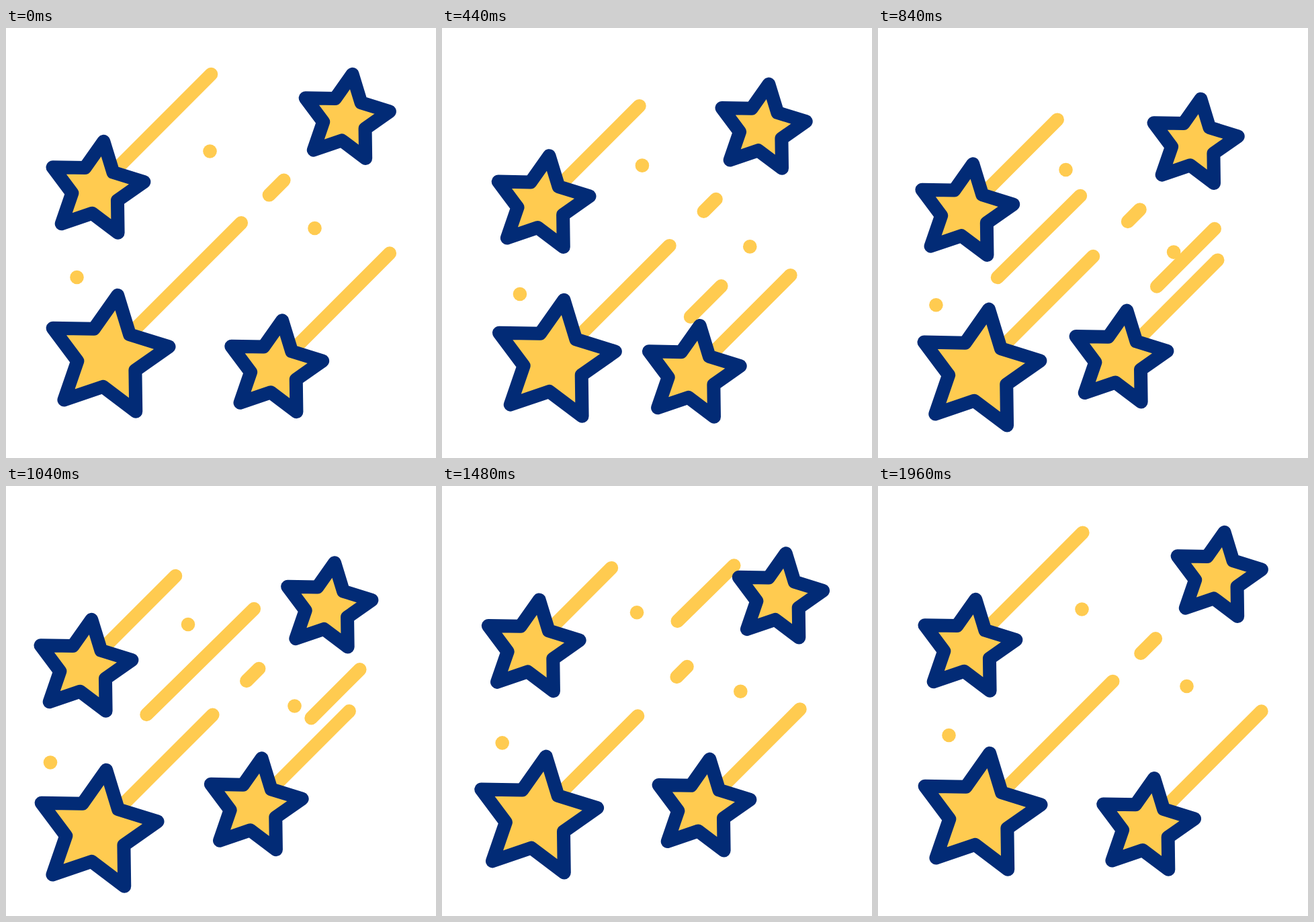
Recreate the animation shown at these times as an HTML page. Size 640x640 px, loop 2000 ms.

```html
<!DOCTYPE html>
<html lang="en">
<head>
<meta charset="utf-8">
<title>Shooting stars</title>
<style>
  html, body { margin: 0; width: 100%; height: 100%; overflow: hidden; background: #fff; }
  svg { display: block; width: 100%; height: 100%; }
  line { stroke: #ffcb50; }
  circle { fill: #ffcb50; }
  polygon { fill: #ffcb50; stroke: #022b76; }
  line, polygon { stroke-width: 20; stroke-linecap: round; stroke-linejoin: round; }
</style>
</head>
<body>
<svg viewBox="0 0 640 640"></svg>
<script>
const LOOP = 2000, STEP = 40;
const svg = document.querySelector('svg');

function add(parent, tag, attrs = {}) {
  const el = parent.appendChild(document.createElementNS('http://www.w3.org/2000/svg', tag));
  set(el, attrs);
  return el;
}

function set(el, attrs) {
  for (const name in attrs) el.setAttribute(name, attrs[name]);
}

// Smooth curve through [time, value] keys, leaving zero at rest and returning to it.
function curve(keys, end) {
  keys = [[0, 0], ...keys, [end, 0]];
  const last = keys.length - 1;
  const gap = i => keys[i + 1][0] - keys[i][0];
  const rate = i => (keys[i + 1][1] - keys[i][1]) / gap(i);
  const slope = i => i === 0 || i === last ? 0
    : (rate(i - 1) * gap(i) + rate(i) * gap(i - 1)) / (gap(i) + gap(i - 1));
  return t => {
    if (t >= end) return 0;
    const i = keys.findIndex(k => k[0] > t) - 1;
    const u = (t - keys[i][0]) / gap(i), v = 1 - u;
    return keys[i][1] * v * v * (1 + 2 * u) + keys[i + 1][1] * u * u * (3 - 2 * u)
      + gap(i) * u * v * (slope(i) * v - slope(i + 1) * u);
  };
}

// Round trip from home through [time, dx, dy] points.
function wander(x, y, points, end = 1720) {
  const dx = curve(points.map(p => [p[0], p[1]]), end);
  const dy = curve(points.map(p => [p[0], p[2]]), end);
  return t => [x + dx(t), y + dy(t)];
}

// Regular five-pointed star, tilted a little clockwise.
function starPoints(size) {
  return Array.from({ length: 10 }, (_, i) => {
    const r = size * (i % 2 ? 36 : 72.3);
    const angle = (i * 36 - 80.9) * Math.PI / 180;
    return [r * Math.cos(angle), r * Math.sin(angle)].join();
  }).join(' ');
}

const progress = (t, start, length) => Math.min(1, Math.max(0, (t - start) / length));

// Lines that grow from one end and are then wiped away from that same end.
const streaks = [
  {
    from: [364, 435.7], to: [544, 255.7],
    head: t => 1 - (1 - progress(t, 265, 1125)) ** 2,
    tail: t => progress(t, 236, 1135) ** 2
  },
  {
    from: [175.5, 373.5], to: [441.5, 111.5],
    head: t => 1 - (1 - progress(t, 600, 1250)) ** 3,
    tail: t => progress(t, 795, 890) ** 1.6
  }
];

const stars = [
  {
    size: 1, trail: 171.4,
    place: wander(133.9, 240.2, [[640, 13.5, 30], [1040, -18, 30], [1320, -4, 6]]),
    shrink: curve([[640, -36], [1040, -35], [1320, -57.5]], LOOP)
  },
  {
    size: 0.922,
    place: wander(505, 134.6, [[640, -38.5, 25], [1040, -26.5, 45.5], [1320, -9.5, 41.5]], 1920)
  },
  {
    size: 1.273, trail: 198.5, dash: 240,
    place: wander(151.6, 488.6, [[640, 15, 12.5], [1040, -17, 25], [1320, -19, 11]]),
    shrink: curve([[640, -35.5], [1040, -25.5], [1320, -50.5]], LOOP)
  },
  {
    size: 1, trail: 171.4,
    place: wander(399.7, 506.7, [[280, -14, 10.5], [640, -42, -1.5], [1200, -23, -37]], LOOP),
    shrink: curve([[280, -23.5], [640, -22], [1320, -31.5]], LOOP)
  }
];

const dots = [
  wander(303.5, 183.5, [[640, -12, 28.5], [1040, -32.5, 22.5], [1320, -24.5, 10.5]]),
  wander(459.5, 298, [[640, -6.5, 37], [1040, -30, 29.5], [1320, -26.5, 16]]),
  wander(105.5, 371, [[640, 5.5, 36], [1040, -39.5, 40.5], [1320, -29, 23]])
].map(place => ({ place, el: add(svg, 'circle', { r: 10.3 }) }));

for (const s of streaks) s.el = add(svg, 'line');
for (const s of stars) {
  s.el = add(svg, 'g');
  if (s.trail) s.trailEl = add(s.el, 'line');
  if (s.dash) s.dashEl = add(s.el, 'line');
  add(s.el, 'polygon', { points: starPoints(s.size) });
}

function drawStreak({ el, from, to, head, tail }, t) {
  const a = tail(t), b = head(t);
  const at = (k, axis) => from[axis] + (to[axis] - from[axis]) * k;
  el.style.display = b > a ? '' : 'none';
  set(el, { x1: at(a, 0), y1: at(a, 1), x2: at(b, 0), y2: at(b, 1) });
}

// Trails point up and right from the middle of their star.
function drawStar(s, t) {
  const diagonal = (el, a, b) => set(el, { x1: a, y1: -a, x2: b, y2: -b });
  set(s.el, { transform: `translate(${s.place(t)})` });
  if (!s.trail) return;
  const shrink = s.shrink(t);
  diagonal(s.trailEl, 0, s.trail + shrink);
  if (s.dash) {
    const start = s.dash + 0.65 * shrink;
    diagonal(s.dashEl, start, start + 22 + 0.14 * shrink);
  }
}

function draw(t) {
  for (const s of streaks) drawStreak(s, t);
  for (const s of stars) drawStar(s, t);
  for (const d of dots) {
    const [cx, cy] = d.place(t);
    set(d.el, { cx, cy });
  }
}

const start = performance.now();
function tick() {
  const t = Math.floor(((performance.now() - start) % LOOP) / STEP) * STEP;
  draw(t < 2 * STEP ? 0 : t);
  requestAnimationFrame(tick);
}
tick();
</script>
</body>
</html>
```
